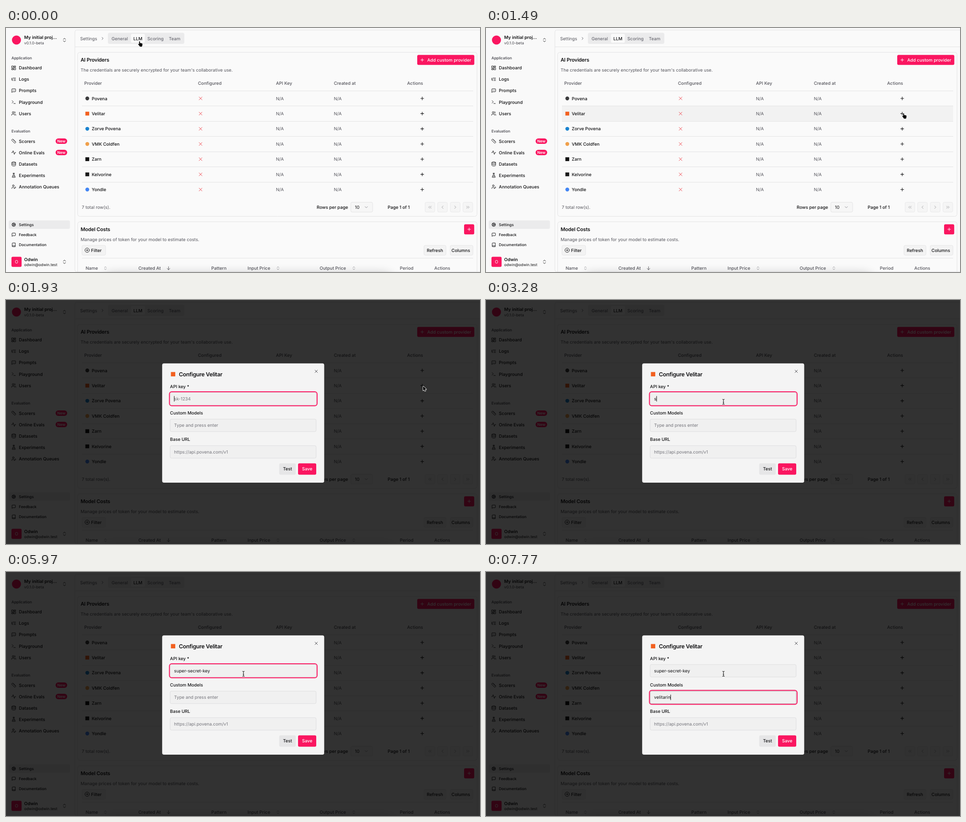
An HTML page with a canvas that plays this animation: 1042x537 px, repeating every 8000 ms.

```html
<!DOCTYPE html>
<html lang="en">
<head>
<meta charset="utf-8">
<title>Provider settings</title>
<style>
html, body { margin: 0; width: 100%; height: 100%; overflow: hidden; background: #fafafa; }
canvas { display: block; width: 1042px; height: 537px; }
</style>
</head>
<body>
<canvas id="stage" width="1042" height="537"></canvas>
<script>
const ctx = document.getElementById('stage').getContext('2d');
const LOOP = 8000, PINK = '#fa1660', INK = '#111113', GRAY = '#55555c', LINE = '#e3e3e4';
const SM = 9.68, XS = 8.32;

const ICONS = {
  dash: 'M3 3h7v9H3zM14 3h7v5h-7zM14 12h7v9h-7zM3 16h7v5H3z',
  logs: 'M21 12h-8M21 6H8M21 18h-8M3 6v4c0 1.1.9 2 2 2h3M3 10v6c0 1.1.9 2 2 2h3',
  prompt: 'M21 15a2 2 0 0 1-2 2H7l-4 4V5a2 2 0 0 1 2-2h14a2 2 0 0 1 2 2zM8 10h.1M12 10h.1M16 10h.1',
  term: 'M4 17l6-6-6-6M12 19h8',
  users: 'M16 21v-2a4 4 0 0 0-4-4H6a4 4 0 0 0-4 4v2M13 7a4 4 0 1 1-8 0 4 4 0 0 1 8 0M22 21v-2a4 4 0 0 0-3-3.9M16 3.1a4 4 0 0 1 0 7.8',
  ruler: 'M21.3 15.3a2.4 2.4 0 0 1 0 3.4l-2.6 2.6a2.4 2.4 0 0 1-3.4 0L2.7 8.7a2.4 2.4 0 0 1 0-3.4l2.6-2.6a2.4 2.4 0 0 1 3.4 0zM14.5 12.5l2-2M11.5 9.5l2-2M8.5 6.5l2-2M17.5 15.5l2-2',
  pulse: 'M22 12h-4l-3 9L9 3l-3 9H2',
  data: 'M21 5a9 3 0 1 1-18 0 9 3 0 0 1 18 0M3 5v14a9 3 0 0 0 18 0V5M3 12a9 3 0 0 0 18 0',
  flask: 'M10 2v7.5L4.7 20a1.4 1.4 0 0 0 1.3 2h12a1.4 1.4 0 0 0 1.3-2L14 9.5V2M8.5 2h7M7 16h10',
  pen: 'M11.5 15H7a4 4 0 0 0-4 4v2M21.4 16.6a2 2 0 0 0-3-3l-4 4-1 3.4 3.4-1zM14 7a4 4 0 1 1-8 0 4 4 0 0 1 8 0',
  gear: 'M20 12a8 8 0 1 1-16 0 8 8 0 0 1 16 0M14 12a2 2 0 1 1-4 0 2 2 0 0 1 4 0M12 2v2M12 22v-2M17 20.7l-1-1.8M11 10.3L7 3.3M20.7 17l-1.8-1M3.3 7l1.8 1M14 12h8M2 12h2M20.7 7l-1.8 1M3.3 17l1.8-1M17 3.3l-1 1.8M11 13.7l-4 7',
  note: 'M21 15a2 2 0 0 1-2 2H7l-4 4V5a2 2 0 0 1 2-2h14a2 2 0 0 1 2 2z',
  book: 'M4 19.5v-15A2.5 2.5 0 0 1 6.5 2H20v20H6.5a2.5 2.5 0 0 1 0-5H20',
  updown: 'M7 15l5 5 5-5M7 9l5-5 5 5',
  right: 'M9 18l6-6-6-6',
  left: 'M15 18l-6-6 6-6',
  down: 'M6 9l6 6 6-6',
  first: 'M11 17l-5-5 5-5M18 17l-5-5 5-5',
  last: 'M6 17l5-5-5-5M13 17l5-5-5-5',
  plus: 'M5 12h14M12 5v14',
  ring: 'M22 12a10 10 0 1 1-20 0 10 10 0 0 1 20 0M8 12h8M12 8v8',
  cross: 'M18 6L6 18M6 6l12 12',
  arrow: 'M12 4v16M19 13l-7 7-7-7'
};
const SHAPES = {};
for (const k in ICONS) SHAPES[k] = new Path2D(ICONS[k]);
const ARROW = new Path2D('M0 0V9.8L2.3 7.7 3.8 11.1 5.5 10.4 4 7.1H7.1z');
const HAND = new Path2D('M2.6 6.4V1.2a1 1 0 0 1 2 0V4.8a.9.9 0 0 1 1.8.1a.9.9 0 0 1 1.8.4a.9.9 0 0 1 1.6.8V8.5c0 1.5-.9 2-.9 3.4H4.2C3.8 10 1.6 8.7.7 7.2c-.4-1 .8-1.6 1.9-.8z');
const BEAM = new Path2D('M-2.5-5.5Q0-5.5 0-4Q0-5.5 2.5-5.5M0-4V4M-2.5 5.5Q0 5.5 0 4Q0 5.5 2.5 5.5M-1.3 1.2h2.6');

function text(s, x, y, { size = SM, weight = 400, color = INK, align = 'left', track = 0 } = {}) {
  ctx.font = `${weight} ${size}px Inter, sans-serif`;
  ctx.letterSpacing = track + 'px';
  ctx.textAlign = align;
  ctx.fillStyle = color;
  ctx.fillText(s, x, y + size * 0.364);
}
const mid = (s, x, y, color = INK) => text(s, x, y, { weight: 500, color });
const heading = (s, x, y, size = 11.1) => text(s, x, y, { size, weight: 600, track: -0.2 });

function box(x, y, w, h, r, fill, stroke, lw = 1) {
  ctx.beginPath();
  ctx.roundRect(x, y, w, h, r);
  if (fill) { ctx.fillStyle = fill; ctx.fill(); }
  if (stroke) { ctx.strokeStyle = stroke; ctx.lineWidth = lw; ctx.stroke(); }
}

function icon(name, x, y, size = 11, color = INK, lw = 0.95) {
  const k = size / 24;
  ctx.save();
  ctx.translate(x - size / 2, y - size / 2);
  ctx.scale(k, k);
  ctx.lineWidth = lw / k;
  ctx.lineCap = ctx.lineJoin = 'round';
  ctx.strokeStyle = color;
  ctx.stroke(SHAPES[name]);
  ctx.restore();
}

function rule(x, y, w, color = LINE) {
  ctx.fillStyle = color;
  ctx.fillRect(x, y, w, 1);
}

function badge(round, x, y, r, color) {
  box(x - r, y - r, 2 * r, 2 * r, round ? r : 0, color);
}

const NAV = [
  ['Dashboard', 'dash'], ['Logs', 'logs'], ['Prompts', 'prompt'], ['Playground', 'term'], ['Users', 'users']
];
const EVAL = [
  ['Scorers', 'ruler', true], ['Online Evals', 'pulse', true], ['Datasets', 'data'],
  ['Experiments', 'flask'], ['Annotation Queues', 'pen']
];
const LOW = [['Settings', 'gear'], ['Feedback', 'note'], ['Documentation', 'book']];

function sidebar() {
  badge(true, 23, 26.5, 10, PINK);
  text('My initial proj…', 40, 20.5, { weight: 600 });
  text('v0.1.0-beta', 40, 33, { size: XS, color: '#3f3f46' });
  icon('updown', 128.5, 26.5, 12);
  const label = { size: XS, weight: 500, color: '#3f3f46' };
  text('Application', 12, 65.5, label);
  text('Evaluation', 12, 227, label);
  const list = (items, y0) => items.forEach(([name, ic, fresh], i) => {
    const y = y0 + i * 25.07;
    icon(ic, 17, y);
    mid(name, 28.3, y);
    if (fresh) {
      box(109, y - 6, 25.5, 12, 6, PINK);
      text('New', 121.7, y, { size: XS, weight: 600, color: '#fff', align: 'center' });
    }
  });
  list(NAV, 87.8);
  list(EVAL, 249);
  box(6, 423.5, 134.5, 18.5, 3, '#ebebec');
  LOW.forEach(([name, ic], i) => {
    const y = 432.8 + i * 22.2;
    icon(ic, 17, y, 10);
    text(name, 28.3, y, { size: XS, weight: 500 });
  });
  box(12, 503.5, 22.3, 22.3, 3, PINK);
  text('O', 23.1, 514.8, { color: '#fff', align: 'center' });
  text('Odwin', 40, 509, { weight: 600 });
  text('odwin@odwin.test', 40, 520.8, { size: XS });
  icon('updown', 128.5, 514.7, 12);
}

const PROVIDERS = [
  ['Povena', '#3c3c3e', true], ['Velitar', '#f2601f', false], ['Zorve Povena', '#1a83d0', true],
  ['VMK Coldfen', '#f0a04b', true], ['Zarn', '#111111', false], ['Kelvorine', '#1b1b1b', false],
  ['Yondle', '#4285f4', true]
];
const ROW = 33.42;

function header() {
  text('Settings', 163, 23, { color: GRAY });
  icon('right', 212.3, 23, 10, GRAY);
  box(224, 10.5, 168, 24.5, 4, '#ebebec');
  box(274.7, 13, 30.6, 19.6, 3, '#fafafa');
  mid('General', 232, 23, '#6b6b73');
  mid('LLM', 280, 23);
  mid('Scoring', 310.8, 23, '#6b6b73');
  mid('Team', 358, 23, '#6b6b73');
  rule(152, 41, 890);
}

function providers(hover) {
  box(157.5, 53.5, 878, 361, 5, null, LINE);
  heading('AI Providers', 164, 70.3);
  box(904, 59.3, 125.5, 22, 3, PINK);
  icon('plus', 915, 70.3, 11, '#fff');
  mid('Add custom provider', 926, 70.3, '#fff');
  text("The credentials are securely encrypted for your team's collaborative use.", 164, 92.6, { color: GRAY });
  [['Provider', 172], ['Configured', 422], ['API Key', 593.5], ['Created at', 720.7], ['Actions', 881.8]]
    .forEach(([s, x]) => mid(s, x, 121.8, GRAY));
  PROVIDERS.forEach(([name, color, round], i) => {
    const y = 155 + i * ROW, top = Math.round(y - 17);
    if (i === hover) { ctx.fillStyle = '#f2f2f2'; ctx.fillRect(167, top + 1, 860, 33); }
    rule(167, top, 860);
    badge(round, 178.7, y, 4.2, color);
    mid(name, 188.5, y);
    icon('cross', 427.7, y, 13, '#ef3b44');
    text('N/A', 593.5, y, { color: GRAY });
    text('N/A', 720.7, y, { color: GRAY });
    icon('plus', 915, y, 11.5, INK, 1.1);
  });
  const y = 394.4;
  text('7 total row(s).', 166.5, y, { color: GRAY });
  mid('Rows per page', 683, y);
  box(758, 383.5, 48, 21.6, 3, '#f6f6f6', LINE);
  text('10', 767, y);
  icon('down', 792, y, 11, '#8a8a8f');
  mid('Page 1 of 1', 839, y);
  [['first', 932], ['left', 959.6], ['right', 987.6], ['last', 1015.3]].forEach(([ic, x]) => {
    box(x - 10.7, 383.5, 21.4, 21.6, 3, '#f5f5f5', '#e9e9ea');
    icon(ic, x, y, 11.5, '#9b9b9f');
  });
}

function costs() {
  box(157.5, 426.5, 878, 130, 5, null, LINE);
  heading('Model Costs', 164, 443);
  box(1007, 432, 22.3, 22.3, 3, PINK);
  icon('plus', 1018.2, 443, 11, '#fff');
  text('Manage prices of token for your model to estimate costs.', 164, 465.6, { color: GRAY });
  const button = (x, w) => box(x, 478.3, w, 21.7, 3, '#f3f3f3', '#e6e6e7');
  button(167, 52);
  icon('ring', 178.4, 489, 11.5);
  mid('Filter', 187, 489);
  button(918.8, 48.4);
  mid('Refresh', 925, 489);
  button(976.5, 50);
  mid('Columns', 979.3, 489);
  rule(167, 506, 860);
  [['Name', 175], ['Created At', 291], ['Pattern', 451.3], ['Input Price', 531], ['Output Price', 689.6], ['Period', 865.8], ['Actions', 941.6]]
    .forEach(([s, x]) => mid(s, x, 528.6, GRAY));
  [218.5, 598, 764.7].forEach(x => icon('updown', x, 528.6, 10, '#7b7b82', 0.8));
  icon('arrow', 357.3, 528.6, 10.5, GRAY);
  // faint shade rising from below the window
  ctx.save();
  ctx.shadowColor = 'rgba(0,0,0,.22)';
  ctx.shadowBlur = 22;
  ctx.shadowOffsetY = -600;
  box(215, 1141, 635, 60, 18, '#000');
  ctx.restore();
}

function page(hover) {
  ctx.fillStyle = '#f9f9f9';
  ctx.fillRect(0, 0, 1042, 537);
  box(151.5, 4.5, 900, 532, 4, '#fafafa', LINE);
  sidebar();
  header();
  providers(hover);
  costs();
}

function field(y, value, hint, focused, caret, dotted) {
  box(360.8, y - 13.7, 321, 27.4, 3, '#f0f0f0', '#dededf');
  if (focused) box(359.3, y - 15.4, 324.6, 30.8, 5, null, PINK, 2);
  if (dotted) {
    ctx.setLineDash([1.5, 1.5]);
    box(361, y - 13.6, 320.6, 27.2, 2, null, '#8f8f92', 0.8);
    ctx.setLineDash([]);
  }
  text(value || hint, 369.6, y, { color: value ? INK : '#74747b' });
  if (caret) {
    const w = value ? ctx.measureText(value).width : 0;
    ctx.fillStyle = '#000';
    ctx.fillRect(369.4 + w, y - 6, 1, 12);
  }
}

function dialog(t) {
  const onKey = t < 6120;
  const caret = !(t >= 2230 && t < 2680) && !(t >= 5970 && t < 6120) && !(t >= 6570 && t < 6870);
  box(343.3, 139.5, 356.2, 262.4, 4, '#f4f4f4');
  badge(false, 367.3, 163.3, 4.8, '#f2601f');
  text('Configure Velitar', 380, 163.4, { size: 12.3, weight: 600, track: -0.3 });
  icon('cross', 682, 157, 11.5, '#4a4a4e');
  mid('API key *', 360.6, 190);
  mid('Custom Models', 360.6, 248.4);
  mid('Base URL', 360.6, 306.9);
  field(217.4, typed('super-secret-key', KEY_STEPS, t), 'sk-1234', onKey, onKey && caret);
  field(275.9, typed('velitarin', MODEL_STEPS, t), 'Type and press enter', !onKey, !onKey && caret, t >= 6870);
  field(334.3, '', 'https://api.povena.com/v1');
  box(600.6, 359.4, 36.4, 25, 3, '#e6e6e7');
  text('Test', 618.8, 371.9, { weight: 500, align: 'center' });
  box(642, 359.4, 40, 25, 3, PINK);
  text('Save', 662, 371.9, { weight: 500, color: '#fff', align: 'center' });
}

// [time, value]: the last entry reached holds
const held = (steps, t) => steps.reduce((v, [at, ...rest]) => t >= at ? rest : v, [0]);
const KEY_STEPS = [[3280, 1], [3430, 2], [3580, 3], [3720, 4], [3870, 6], [4170, 8], [4470, 9], [4620, 10],
  [4770, 11], [4920, 12], [5070, 13], [5220, 14], [5370, 15], [5520, 16]];
const MODEL_STEPS = [[6870, 1], [7020, 3], [7170, 4], [7320, 6], [7620, 8], [7770, 9]];
const typed = (s, steps, t) => s.slice(0, held(steps, t)[0]);

const POINTER = [[0, 290, 29, HAND], [450, 560, 102, ARROW], [600, 733, 145, ARROW],
  [1050, 812, 163, ARROW], [1200, 925, 185, ARROW], [1350, 918, 188, HAND], [1490, 914.5, 187.5, HAND],
  [1790, 917, 189.5, ARROW], [2230, 878, 193, ARROW], [2380, 780, 201, ARROW], [2530, 668, 211, BEAM],
  [2680, 588, 218, BEAM], [2830, 540, 222, BEAM], [2980, 522, 224, BEAM]];

function pointer(x, y, shape) {
  ctx.save();
  ctx.translate(x, y);
  ctx.lineJoin = 'round';
  ctx.strokeStyle = '#fff';
  if (shape === BEAM) {
    ctx.lineWidth = 2.2;
    ctx.stroke(shape);
    ctx.strokeStyle = '#111';
    ctx.lineWidth = 1.1;
    ctx.stroke(shape);
  } else {
    ctx.lineWidth = 1.6;
    ctx.stroke(shape);
    ctx.fillStyle = '#000';
    ctx.fill(shape);
  }
  ctx.restore();
}

function draw(t) {
  const [px, py, shape] = held(POINTER, t);
  const hover = t >= 600 && t < 1790 ? Math.floor((py - 138) / ROW) : -1;
  ctx.textRendering = 'geometricPrecision';
  page(hover);
  const open = t < 1790 ? 0 : t < 1930 ? 0.55 : 1;
  if (open) {
    ctx.fillStyle = `rgba(0,0,0,${0.8 * open})`;
    ctx.fillRect(0, 0, 1042, 537);
    const k = 0.95 + 0.05 * open;
    ctx.save();
    ctx.globalAlpha = open;
    ctx.translate(521.4, 270.7 + 5.2 * (1 - open));
    ctx.scale(k, k);
    ctx.translate(-521.4, -270.7);
    dialog(t);
    ctx.restore();
  }
  pointer(px, py, shape);
}

const start = performance.now();
function tick() {
  draw((performance.now() - start) % LOOP);
  requestAnimationFrame(tick);
}
tick();
</script>
</body>
</html>
```
